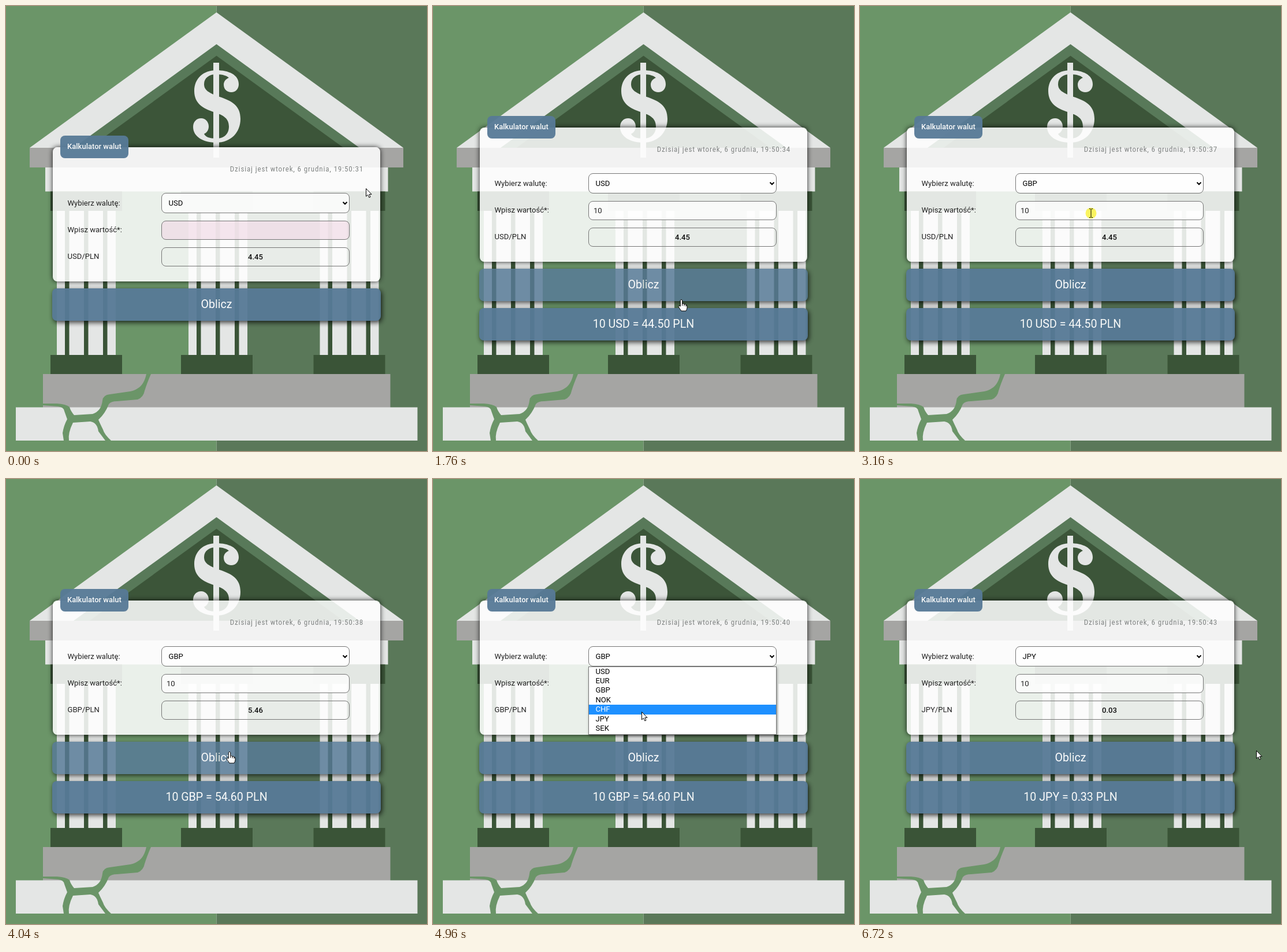
Write an HTML page that moves like this. It is 729 px wide and 769 px high and loops after 7000 ms.

```html
<!DOCTYPE html>
<html lang="pl">
<head>
<meta charset="utf-8">
<title>Kalkulator walut</title>
<style>
html, body { margin: 0; width: 100%; height: 100%; overflow: hidden; }
body { position: relative; font: 13.1px Roboto, sans-serif; color: #222; }
svg { position: absolute; left: 0; top: 0; overflow: visible; }
#ui, #ui div { position: absolute; box-sizing: border-box; white-space: pre; }
#ui { inset: 0; }
#ui .card { left: 81px; top: 243.5px; width: 567px; height: 232px; border-radius: 8px;
  background: rgba(255,255,255,.86); box-shadow: 0 0 9px rgba(0,0,0,.85); }
#ui .blue { left: 80px; width: 569px; height: 56px; border-radius: 8px; background: #577a97;
  opacity: .95; color: #fff; text-align: center; font-size: 19.6px; line-height: 56px;
  box-shadow: 2px 3px 9px rgba(0,0,0,.8); }
#ui .legend { left: 94px; top: 224px; width: 118px; height: 39px; font-size: 13px;
  font-weight: 500; line-height: 38px; box-shadow: none; }
#date { right: 110px; top: 272px; line-height: 20px; color: #808483; letter-spacing: .82px;
  font-family: "Roboto Condensed", Roboto, sans-serif; font-stretch: 75%; }
.label { left: 106.5px; line-height: 20px; }
#ui .field { left: 269px; width: 326px; border: 1px solid #767676; border-radius: 8px; }
#select { top: 323px; height: 35px; padding-left: 11.5px; line-height: 33px;
  background: rgba(255,255,255,.78); color: #000; }
#input { top: 371px; height: 33px; padding-left: 8px; line-height: 31px;
  background: rgba(255,255,255,.75); }
#input.empty { background: rgba(241,220,231,.7); }
#input.focus { border-color: #000; box-shadow: inset 0 0 0 1px #000; }
#input.caret::after { content: ""; position: absolute; top: 8px; height: 15px;
  border-left: 1px solid #000; }
#spinner { right: 8px; top: 9px; width: 12px; height: 14px; background: #efefef; visibility: hidden; }
.focus #spinner { visibility: visible; }
#rate { top: 416.5px; height: 33px; line-height: 31px; text-align: center; font-weight: 500; color: #111; }
#list { left: 269px; top: 357.5px; width: 326px; height: 118px; border: 1px solid #767676;
  background: #fff; color: #000; box-shadow: 1px 2px 4px rgba(0,0,0,.35); }
#list div { left: 0; width: 324px; height: 16.45px; padding-left: 11.5px; line-height: 16.45px; }
#list .on { background: #1e90ff; color: #fff; }
</style>
</head>
<body>
<svg width="729" height="769" fill="#e4e6e5">
  <path fill="#6b9568" d="M0 0H364.5V769H0Z"/>
  <path fill="#5a7859" d="M364.5 0H729V769H364.5Z"/>
  <path d="M364.5 11L688 245H41Z"/>
  <path fill="#587959" d="M364.5 66L612 245H117Z"/>
  <path fill="#3c5539" d="M364.5 86L584.5 245H144.5Z"/>
  <path fill="#a5a5a3" d="M41 245H688V279H41ZM64 636H665.5V694H64Z"/>
  <path d="M68 279H661.5V320.5H68ZM17 693.5H712.5V751H17Z"/>
  <path d="M359 98H369V262H359Z"/>
  <path d="M403 135C403 119 386 111 364 111C342 111 326 125 326 147C326 168 341 177 359 183
    C378 189 386 195 386 208C386 222 377 229 364 229C352 229 345 226 343 221C348 219 351 214 351 208
    C351 200 345 194 338 194C330 194 324 200 324 209C324 226 342 236 364 236C390 236 406 218 406 195
    C406 172 391 164 370 157C350 150 343 145 343 135C343 124 352 118 364 118C376 118 383 121 386 124
    C381 126 377 130 377 136C377 144 383 149 390 149C398 149 403 143 403 135Z"/>
  <g id="columns"></g>
  <path fill="#6b9568" d="M243 636C240 650 234 662 215 666L180 671Q168 672 167 682Q165 700 150 705L118 707
    Q112 700 110 693Q104 688 88 687H64V690L90 692Q100 693 101 700L106 714Q100 725 98 738L100 751H109
    Q107 738 116 720L146 718Q158 720 160 735L172 751H182Q170 740 168 732Q163 722 160 715Q172 704 178 688
    Q182 683 192 683L228 680Q238 676 240 665Q244 652 251 636Z"/>
</svg>

<div id="ui">
  <div class="card"></div>
  <div class="blue legend">Kalkulator walut</div>
  <div id="date"></div>
  <div class="label" style="top:330.5px">Wybierz walutę:</div>
  <div class="label" style="top:377px">Wpisz wartość*:</div>
  <div class="label" style="top:422.5px" id="pair"></div>
  <div class="field" id="select"></div>
  <svg width="729" height="769"><path d="M583.5 338.8L587 342.3L590.5 338.8" fill="none" stroke="#000" stroke-width="2"/></svg>
  <div class="field" id="input"><span id="value"></span><div id="spinner"><svg width="12" height="14" fill="#505050"><path d="M3 5L6 2L9 5ZM3 9L6 12L9 9Z"/></svg></div></div>
  <div class="field" id="rate"></div>
  <div class="blue" id="button" style="top:488px">Oblicz</div>
  <div class="blue" id="result" style="top:556px"></div>
  <div id="list"></div>
</div>

<svg width="729" height="769">
  <g id="pointer" fill="#fff" stroke="#000">
    <circle id="click" r="9.5" fill="#faf028" fill-opacity=".74" stroke="none"/>
    <path id="arrow" d="M.5 .5V14L3.6 11.2L5.8 16L8 15L5.9 10.4H10Z"/>
    <path id="hand" d="M-1.7 1.5Q0 -1 1.7 1.5V7.5Q4 6.500 5 8.500Q7.500 7.500 8 9.500Q10 9 10 12V15Q9.500 18 8 20H0Q-3 16 -5 12.500Q-4.500 10 -1.700 12ZM1.700 7.500V11M5 8.500V11.500M8 9.500V12"/>
    <path id="beam" fill="none" d="M-3 -7.500H-1L0 -6.500L1 -7.500H3M0 -6.500V6.500M-3 7.500H-1L0 6.500L1 7.500H3"/>
  </g>
</svg>

<script>
const $ = id => document.getElementById(id);
const LOOP = 7000, STEP = 40, LIFT = 34;
const currencies = ["USD", "EUR", "GBP", "NOK", "CHF", "JPY", "SEK"];

// time, x, y of the pointer tip
const path = [
  [40, 623, 315], [400, 438, 384], [1200, 438, 384], [1400, 439, 483], [1520, 430, 507],
  [2080, 430, 507], [2480, 412, 314], [2760, 412, 314], [2960, 400, 358], [3200, 400, 358],
  [3560, 386, 477], [4000, 386, 477], [4360, 405, 312], [4800, 405, 312], [4960, 361, 402],
  [5080, 352, 414], [5440, 352, 414], [5720, 356, 481], [6400, 356, 481], [6720, 686, 469]
];
const clicks = [640, 1680, 2520, 3120, 3680, 4520, 5160, 5720];
const lists = [{ open: 2550, close: 3160, current: 0 }, { open: 4490, close: 5200, current: 2 }];
const results = [
  { from: 0, code: "USD", rate: "4.45", sum: "44.50" },
  { from: 3720, code: "GBP", rate: "5.46", sum: "54.60" },
  { from: 5800, code: "JPY", rate: "0.03", sum: "0.33" }
];

for (const [capital, shaft] of [[77, 88], [303, 316], [532.5, 543.5]]) {
  const bar = (x, y, w, h, fill) =>
    `<rect x="${x}" y="${y}" width="${w}" height="${h}" fill="${fill}"/>`;
  const dark = "#3a5437";
  let shapes = bar(capital, 320.5, 124, 33.5, dark) + bar(shaft, 354, 102, 249.5, "#e4e6e5");
  for (let i = 0; i < 3; i++) shapes += bar(shaft + 14 + i * 33, 354, 7.5, 249.5, dark);
  $("columns").innerHTML += shapes + bar(capital, 603, 124, 33, dark);
}
currencies.forEach((code, i) => {
  $("list").innerHTML += `<div style="top:${i * 16.45}px">${code}</div>`;
});

function pointerAt(t) {
  const next = path.findIndex(p => p[0] > t);
  if (next === 0) return path[0].slice(1);
  if (next < 0) return path.at(-1).slice(1);
  const [t0, x0, y0] = path[next - 1], [t1, x1, y1] = path[next];
  const u = (t - t0) / (t1 - t0), e = u * u * (3 - 2 * u);
  return [x0 + (x1 - x0) * e, y0 + (y1 - y0) * e];
}

function draw(t) {
  const lifted = t >= 1760, lift = lifted ? LIFT : 0;
  const [x, y] = pointerAt(t);
  const clicking = clicks.some(c => t >= c && t < c + 80);
  const inside = (top, bottom, left, right) =>
    x > left && x < right && y + lift > top && y + lift < bottom;

  $("ui").style.transform = `translateY(${-lift}px)`;
  $("date").textContent = `Dzisiaj jest wtorek, 6 grudnia, 19:50:${31 + Math.floor((t + 453) / 593)}`;

  const value = t < 760 ? "" : t < 1040 ? "1" : "10";
  const focused = t >= 640 && t < 1720;
  $("value").textContent = value;
  $("input").classList.toggle("empty", !value);
  $("input").classList.toggle("focus", focused);
  $("input").classList.toggle("caret", focused && t < 1040);

  const { code, rate, sum } = results.findLast(r => t >= r.from);
  $("select").textContent = t < 3160 ? "USD" : t < 5200 ? "GBP" : "JPY";
  $("pair").textContent = code + "/PLN";
  $("rate").textContent = rate;
  $("result").textContent = `10 ${code} = ${sum} PLN`;
  $("result").style.visibility = lifted ? "visible" : "hidden";

  const list = lists.find(l => t >= l.open && t < l.close);
  $("list").style.opacity = list ? Math.min(1, (t - list.open) / 70) : 0;
  if (list) {
    const row = Math.floor((y + lift - 358.5) / 16.45);
    const active = row < 0 ? list.current : row;
    [...$("list").children].forEach((item, i) => item.classList.toggle("on", i === active));
  }

  const onButton = inside(488, 544, 80, 649);
  const onInput = !list && inside(371, 404, 269, 595);
  $("button").style.opacity = !onButton ? .95 : clicking ? .65 : .83;

  $("pointer").setAttribute("transform", `translate(${Math.round(x)} ${Math.round(y)})`);
  const show = (id, on) => $(id).setAttribute("visibility", on ? "visible" : "hidden");
  show("click", clicking);
  show("hand", onButton);
  show("beam", onInput);
  show("arrow", !onButton && !onInput);
}

const start = performance.now();
function tick() {
  const t = (performance.now() - start) % LOOP;
  draw(Math.floor(t / STEP) * STEP);
  requestAnimationFrame(tick);
}
tick();
</script>
</body>
</html>
```
